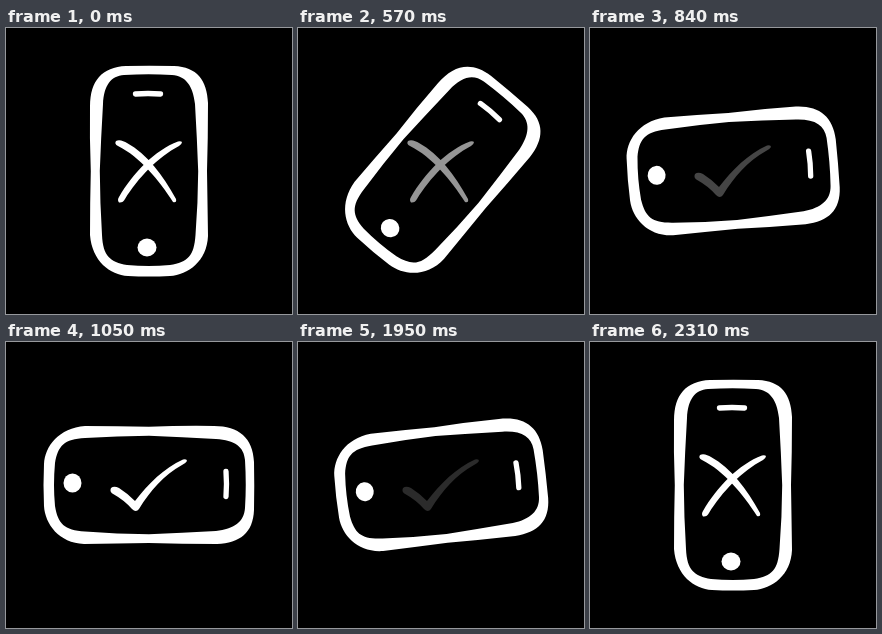
Animation of 286 by 286 pixels, one loop 2.76 s. Source, as an HTML page with a canvas:

```html
<!DOCTYPE html>
<html lang="en">
<head>
<meta charset="utf-8">
<title>Rotate your phone</title>
<style>
  html, body { margin: 0; width: 100%; height: 100%; overflow: hidden; background: #000; }
  canvas { display: block; width: 100vw; height: 100vh; }
</style>
</head>
<body>
<canvas id="stage" width="286" height="286"></canvas>
<script>
const ctx = document.getElementById('stage').getContext('2d');
const SIZE = 286, MID = SIZE / 2;
const LOOP = 2760, STEP = 30, START = 450, TURN = 600, FADE = 0.48;

const body = new Path2D(
  'M120 38 Q143 37.5 168 38 C191 39 201 52 202 75 Q202 110 201 143' +
  'Q201.5 175 202 208 C201 233 182 247 164 248 Q143 249 122 248' +
  'C104 247 86 233 84 207 Q84 175 84.8 143 Q83.5 110 84 78 C84 53 96 39 120 38Z' +
  'M118 47 Q143 45.5 166 47 C180 48 187 58 189 76 Q191 110 192.2 143' +
  'Q192 175 189.5 207 C188 228 182 234 164 237 Q143 239 121 237' +
  'C104 234 97 228 96 207 Q94 175 93.8 143 Q95 110 97 76 C98 57 105 48 118 47Z');
const speaker = new Path2D('M129.5 66 Q142 65 154.5 66');
const cross = new Path2D(
  'M110 113 C113 111 118 113 121 115 C141 126 157 147 170 171' +
  'Q171 175 167 174 C153 152 134 129 112 118 Q108 116 110 113Z' +
  'M176 114 Q176 116 173 118 C152 129 132 150 119 171' +
  'Q117 175 113 174.5 Q111 172 113 169 C127 145 149 122 172 113.5 Q175 113 176 114Z');
const tick = new Path2D(
  'M105 146 Q108 143.5 113 146 Q121 151 129 159 C142 142 158 126 177 117.5' +
  'Q181 116.5 181 119 Q180 121 176 123 C158 133 144 149 133 167' +
  'Q130 171 126 167 Q118 158 108 152.5 Q103 150 105 146Z');

const clamp = v => Math.min(1, Math.max(0, v));

// cubic-bezier(.25, 0, 0, 1)
function ease(x) {
  if (x <= 0 || x >= 1) return clamp(x);
  let lo = 0, hi = 1;
  for (let i = 0; i < 30; i++) {
    const u = (lo + hi) / 2;
    if (0.75 * u * (1 - u) ** 2 + u ** 3 < x) lo = u; else hi = u;
  }
  return lo * lo * (3 - 2 * lo);
}

function drawSign(path, alpha) {
  ctx.globalAlpha = clamp(alpha);
  ctx.fill(path, 'nonzero');
  ctx.globalAlpha = 1;
}

function drawPhone(angle) {
  ctx.save();
  ctx.translate(MID, MID);
  ctx.rotate(angle);
  ctx.translate(-MID, -MID);
  ctx.fill(body, 'evenodd');
  ctx.lineWidth = 5.3;
  ctx.lineCap = 'round';
  ctx.stroke(speaker);
  ctx.beginPath();
  ctx.ellipse(141, 219.5, 9.5, 9, 0, 0, Math.PI * 2);
  ctx.fill();
  ctx.restore();
}

function draw(time) {
  const t = Math.floor(time % LOOP / STEP) * STEP;
  // The second half plays the first one backwards.
  const p = clamp((Math.min(t, LOOP - t) - START) / TURN);
  ctx.fillStyle = '#000';
  ctx.fillRect(0, 0, SIZE, SIZE);
  ctx.fillStyle = ctx.strokeStyle = '#fff';
  drawPhone(ease(p) * Math.PI / 2);
  drawSign(cross, 1 - p / FADE);
  drawSign(tick, 1 - (1 - p) / FADE);
}

function loop() {
  draw(performance.now());
  requestAnimationFrame(loop);
}
loop();
</script>
</body>
</html>
```
